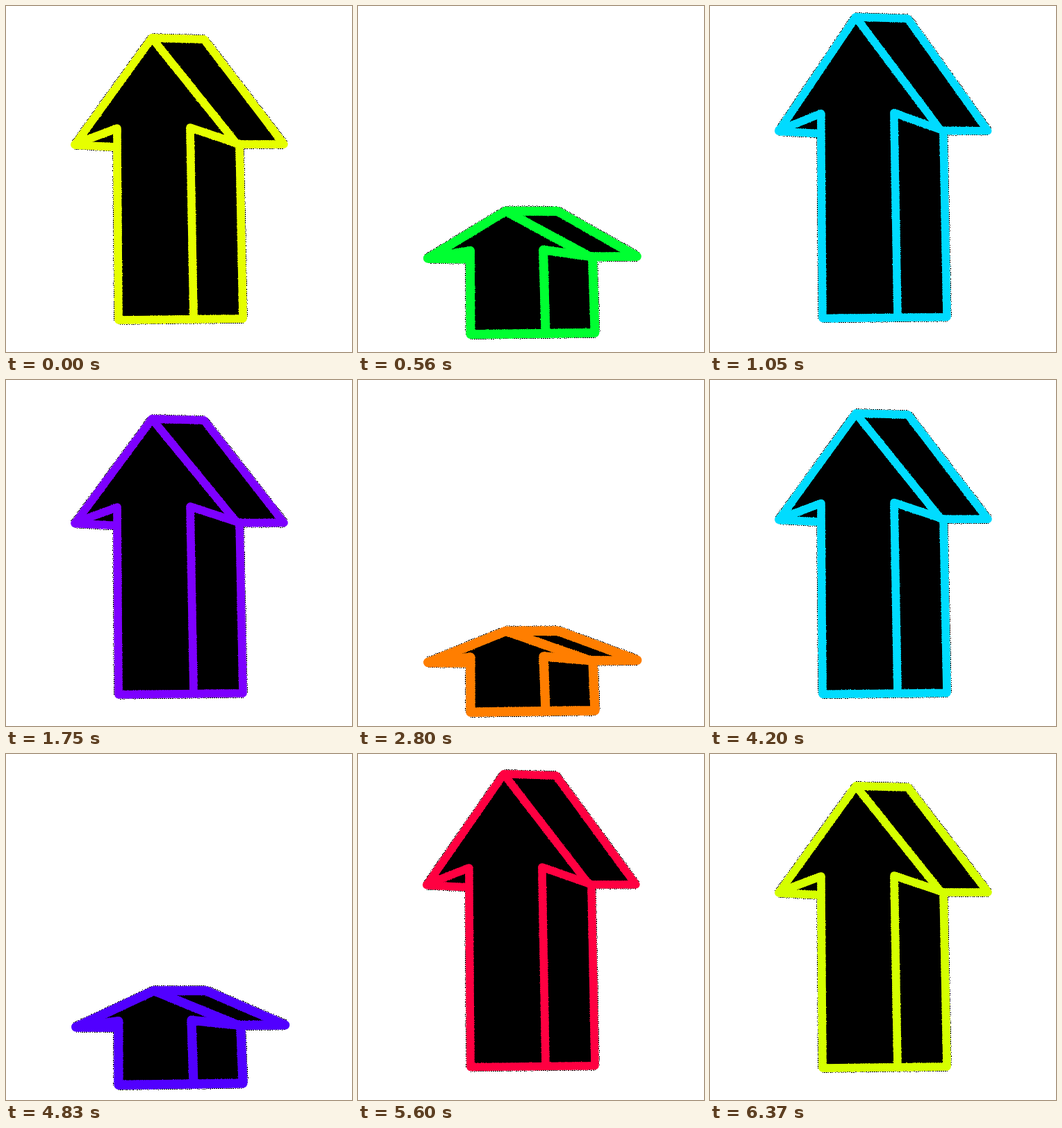
An HTML page with a canvas for the animation above (6440 ms loop, 498 by 498 pixels).

```html
<!DOCTYPE html>
<html lang="en">
<head>
<meta charset="utf-8">
<title>Bouncing arrow</title>
<style>
  html, body { margin: 0; width: 100%; height: 100%; overflow: hidden; background: #fff; }
  canvas { display: block; width: 498px; height: 498px; }
</style>
</head>
<body>
<canvas id="stage" width="498" height="498"></canvas>
<script>
const SIZE = 498, STEP = 70, STEPS = 92;
const ctx = document.getElementById('stage').getContext('2d');

// Arrow at rest: silhouette runs clockwise, inner lines join on to it.
const TOP = 46, BOTTOM = 452, HEIGHT = BOTTOM - TOP;
const OUTLINE = [[210, TOP], [285, 48], [400, 199], [336, 199], [341, 450], [162, BOTTOM], [160, 203], [99, 200]];
const INNER = [
  [[210, TOP], [331, 197]],
  [[99, 199], [160, 176], [160, 203]],
  [[336, 199], [265, 175], [270, 449]]
];

const BOUNCE_STARTS = [0, 31, 60.3];
const SQUASHED = 315, STRETCHED = -30, SAGGED = 10;

// How far the tip has sunk: squash, launch, sag, settle.
function tipDrop(phase) {
  const move = (from, to, amount) => from + (to - from) * amount;
  if (phase < 9) return move(0, SQUASHED, (phase / 9) ** 2);
  if (phase < 15) return move(STRETCHED, SQUASHED, ((15 - phase) / 6) ** 4);
  if (phase < 25) return move(STRETCHED, SAGGED, ((phase - 15) / 10) ** 1.5);
  return move(SAGGED, 0, Math.min(1, (phase - 25) / 5));
}

// Two turns of the colour wheel, slowing slightly.
const hueAt = step => (66 + 8.2 * step - 0.0027 * step * step) % 360;

function randomFrom(seed) {
  let s = seed * 7919 + 17;
  return () => (s = (s * 16807) % 2147483647) / 2147483647;
}

function trace(points, closed) {
  ctx.beginPath();
  points.forEach(([x, y]) => ctx.lineTo(x, y));
  if (closed) ctx.closePath();
}

// Single-pixel specks along a line, at the distance returned by offset() to its left.
function roughen(points, offset) {
  for (let i = 1; i < points.length; i++) {
    const [x0, y0] = points[i - 1], [x1, y1] = points[i];
    const dx = x1 - x0, dy = y1 - y0, length = Math.hypot(dx, dy);
    for (let d = 0; d < length; d += 1.5) {
      const o = offset() / length, k = d / length;
      ctx.fillRect(Math.floor(x0 + dx * k + dy * o), Math.floor(y0 + dy * k - dx * o), 1, 1);
    }
  }
}

function draw(step) {
  const start = BOUNCE_STARTS.filter(s => s <= step).pop();
  const drop = tipDrop(step - start);
  const squash = drop / SQUASHED;
  const top = TOP + drop, bottom = BOTTOM + drop * 0.08;

  // Squashing also pushes the head right and tilts the arrow a little.
  const place = ([x, y]) => {
    const depth = (y - TOP) / HEIGHT;
    return [
      x + 3 * squash * (1 - depth),
      top + depth * (bottom - top) + squash * (SIZE / 2 - x) * 0.01
    ];
  };
  const outline = OUTLINE.map(place), inner = INNER.map(line => line.map(place));
  const loop = [...outline, outline[0]];
  const random = randomFrom(step + 1);
  const width = 11.5 + 1.7 * squash, edge = width / 2;

  ctx.fillStyle = '#fff';
  ctx.fillRect(0, 0, SIZE, SIZE);
  ctx.fillStyle = '#000';
  trace(outline, true);
  ctx.fill();
  roughen(loop, () => edge + random());

  ctx.strokeStyle = ctx.fillStyle = `hsl(${hueAt(step)}, 100%, 50%)`;
  ctx.lineWidth = width;
  ctx.lineCap = ctx.lineJoin = 'round';
  trace(outline, true);
  ctx.stroke();
  for (const line of inner) {
    trace(line);
    ctx.stroke();
  }
  for (const line of [loop, ...inner]) {
    roughen(line, () => (random() < 0.5 ? -1 : 1) * (edge - 0.5 + random() * 0.7));
  }
}

function tick(now) {
  draw(Math.floor(now / STEP) % STEPS);
  requestAnimationFrame(tick);
}
draw(0);
requestAnimationFrame(tick);
</script>
</body>
</html>
```
